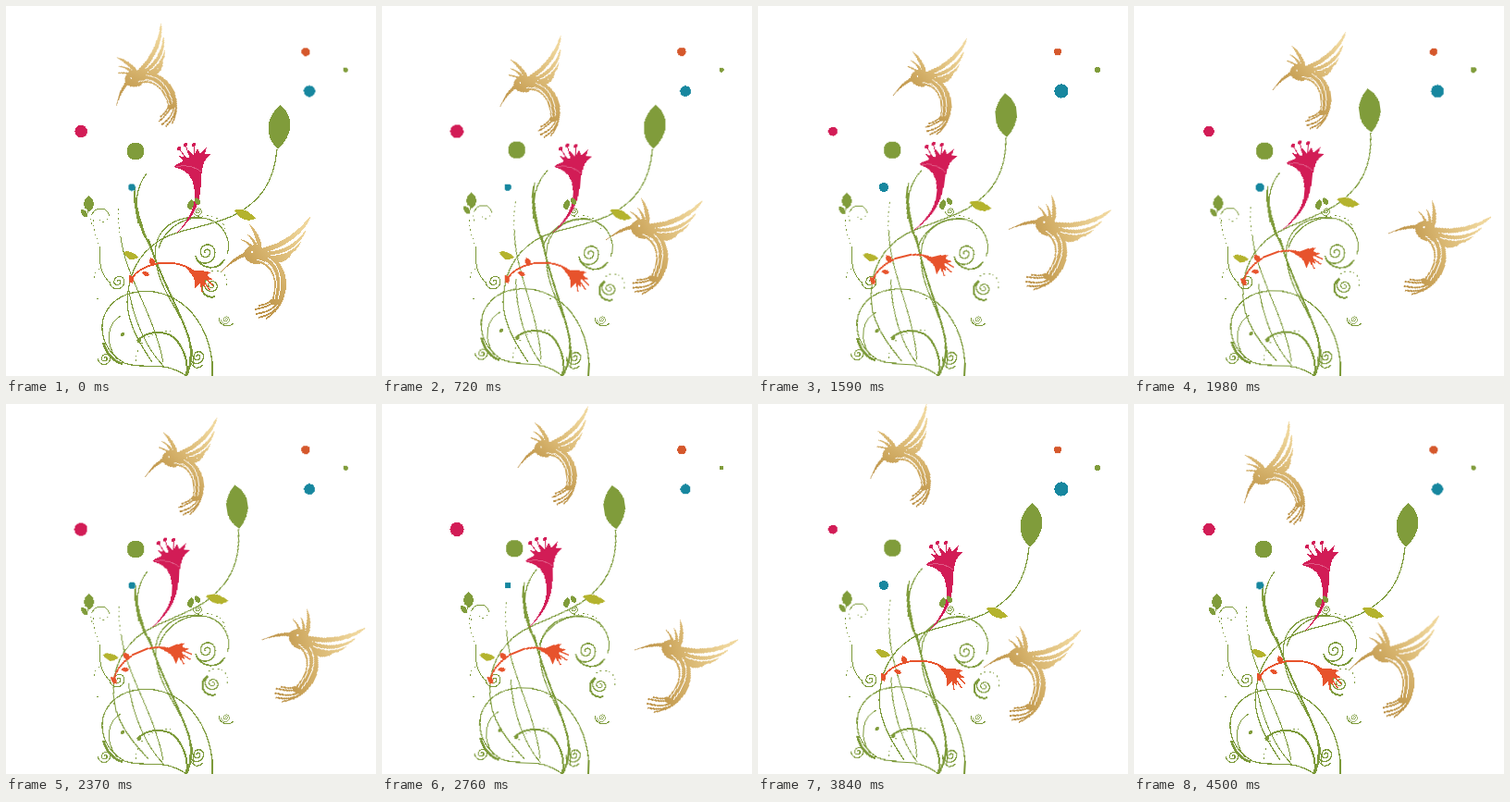
Recreate the animation shown at these times as an HTML page without scripts. Size 400 px wide and 400 px high, loop 4.53 s.

```html
<!DOCTYPE html>
<html lang="en">
<head>
<meta charset="utf-8">
<title>Hummingbirds and flowers</title>
<style>
  html, body { margin: 0; width: 100%; height: 100%; overflow: hidden; background: #fff; }
  svg { display: block; width: 100%; height: 100%; shape-rendering: crispEdges; }

  .line { fill: none; stroke: #7b9938; stroke-width: 1.2; }
  .fine { stroke-width: 1; }
  .faint { stroke-width: 1; stroke-dasharray: 2 3 1 4; }
  .bold { stroke-width: 2; }
  .green { fill: #809c3b; stroke: none; }
  .lime { fill: #b4b32e; }
  .pink { fill: #d21c56; }
  .orange { fill: #e7532c; }
  .teal { fill: #17879f; }

  /* Two sways per loop */
  .sway, .loops, .sprig, .ball, .curl, .dot {
    animation: 1.1325s cubic-bezier(.37, 0, .63, 1) infinite alternate;
  }
  .sway, .loops { transform-origin: 195px 400px; }
  .sway { animation-name: sway; }
  .loops { animation-name: loops; }
  .sprig { animation-name: sprig; }
  .ball { animation-name: ball; }
  .curl { animation-name: curl; }
  .dot { animation-name: pulse; animation-delay: -.7s; transform-box: fill-box; transform-origin: center; }
  .dot.late { animation-delay: -1.8325s; }
  @keyframes sway { to { transform: rotate(10deg); } }
  @keyframes loops { to { transform: rotate(5deg); } }
  @keyframes sprig { to { transform: translate(10px, -5px); } }
  @keyframes ball { to { transform: translate(8px, -2px); } }
  @keyframes curl { to { transform: translate(33px, 5px); } }
  @keyframes pulse { from { transform: scale(var(--low)); } }

  /* One bend per loop */
  .stem, .trumpet, .bloom { animation: 4.53s cubic-bezier(.37, 0, .63, 1) infinite; }
  .stem { animation-name: bend; --bend: -9deg; transform-origin: 148px 410px; }
  .trumpet { animation-name: bend; --bend: -14deg; transform-origin: 134px 299px; }
  .bloom { animation-name: bloom; transform-origin: 186px 244px; }
  @keyframes bend {
    0%, 13%, 85%, 100% { transform: none; }
    52%, 58% { transform: rotate(var(--bend)); }
  }
  @keyframes bloom {
    0%, 85%, 100% { transform: rotate(0deg); }
    42% { transform: rotate(13.5deg); }
  }

  .upper, .lower { animation: 4.53s linear infinite; }
  .upper { animation-name: upper; }
  .lower { animation-name: lower; }
  @keyframes upper {
    0%, 100% { transform: translate(119px, 109px) rotate(-29.8deg); }
    8% { transform: translate(122px, 111.5px) rotate(-24.5deg); }
    15.9% { transform: translate(127px, 110px) rotate(-17.7deg); }
    21.2% { transform: translate(133px, 106px) rotate(-12deg); }
    26.5% { transform: translate(139px, 101px) rotate(-7deg); }
    35% { transform: translate(145px, 98px) rotate(-6deg); }
    43.7% { transform: translate(149px, 92px) rotate(-6.7deg); }
    52.3% { transform: translate(149.5px, 80px) rotate(-7.8deg); }
    60.9% { transform: translate(146px, 70px) rotate(-9.4deg); }
    73% { transform: translate(136px, 72px) rotate(-14deg); }
    84.8% { transform: translate(121px, 82px) rotate(-21.4deg); }
    92.4% { transform: translate(118px, 100px) rotate(-27deg); }
    96% { transform: translate(118.5px, 107px) rotate(-29.2deg); }
  }
  @keyframes lower {
    0%, 100% { transform: translate(233px, 287px); }
    8% { transform: translate(235.5px, 271px) rotate(4.4deg); }
    15.9% { transform: translate(242px, 253px) rotate(9.5deg); }
    21.2% { transform: translate(253px, 245px) rotate(14.3deg); }
    26.5% { transform: translate(264px, 241px) rotate(18.6deg); }
    35% { transform: translate(271px, 241.5px) rotate(20.8deg); }
    43.7% { transform: translate(275px, 246px) rotate(22.3deg); }
    52.3% { transform: translate(276.5px, 255px) rotate(25deg); }
    60.9% { transform: translate(273px, 266px) rotate(25.8deg); }
    73% { transform: translate(266px, 277px) rotate(22deg); }
    84.8% { transform: translate(244px, 285px) rotate(10.4deg); }
    92.4% { transform: translate(236px, 288px) rotate(4.6deg); }
  }
</style>
</head>
<body>
<svg viewBox="0 0 400 400">
  <defs>
    <linearGradient id="gold" gradientUnits="userSpaceOnUse" x1="5" y1="20" x2="90" y2="-45">
      <stop offset="0" stop-color="#b48639"/>
      <stop offset=".35" stop-color="#c8a157"/>
      <stop offset=".6" stop-color="#dab873"/>
      <stop offset="1" stop-color="#efd69b"/>
    </linearGradient>
    <path id="spiral" d="M0 0a2.5 2.5 0 0 1 5 0a4.5 4.5 0 0 1-9 0a7 7 0 0 1 14 0a10 10 0 0 1-20 0"/>
    <g id="bird">
      <g fill="url(#gold)">
        <path d="M0 0C7-9 15-16 24-20C27-29 38-32 45-25C51-19 49-9 40-8C33-7 27-11 25-16C16-13 8-7 0 0Z"/>
        <path d="M36-10C50-9 57 2 57 15C57 24 55 31 52 36L62 36C67 31 70 24 70 14C70-3 60-17 44-21Z"/>
        <path d="M44-25C66-30 84-44 97-61C92-43 70-26 45-20Z"/>
        <path d="M46-21C66-22 80-29 92-46C86-27 68-18 47-17Z"/>
        <path d="M47-17C64-16 75-20 86-32C79-16 64-12 48-13Z"/>
        <path d="M48-14C60-12 69-14 77-21C72-9 60-8 50-10Z"/>
        <path d="M44-22C44-34 38-45 29-53C35-43 38-33 40-23Z"/>
        <path d="M41-22C38-33 33-38 25-42C32-37 35-31 37-23Z"/>
        <path d="M37-23C33-30 28-33 20-35C27-31 31-28 34-23Z"/>
      </g>
      <path fill="none" stroke="url(#gold)" stroke-width="1.7" d="M67 27C62 41 53 47 40 50M63 30C58 40 50 44 37 46M59 31C53 37 46 39 36 41M55 30C51 35 46 36 40 37M66 30C61 42 55 47 48 51"/>
      <path fill="none" stroke="#fff" d="M47-11C58-4 62 10 57 30M50-15C63-7 67 10 61 30M38-13C50-10 56-3 58 7"/>
      <circle cx="33" cy="-21" r="1" fill="#fff"/>
    </g>
  </defs>

  <g class="loops line">
    <path d="M195 400C170 382 148 394 128 386C96 368 95 326 130 312C170 298 216 325 223 385V400"/>
    <path stroke-width="2.6" d="M105 364C109 376 116 384 126 387"/>
    <path class="fine" d="M120 382C106 364 110 343 124 335"/>
    <path class="bold" d="M142 362C153 350 176 350 185 362C194 374 197 388 195 400"/>
    <path class="faint" d="M140 384C142 360 160 350 182 352"/>
    <use href="#spiral" transform="translate(206 379) scale(.75)" stroke-width="1.8"/>
    <path d="M198.500 379C199 390 206 395 213 388"/>
    <use href="#spiral" transform="translate(106 381) scale(.65)" stroke-width="1.8"/>
    <circle class="green" cx="126" cy="355" r="2"/>
    <circle class="green" cx="144" cy="362" r="2"/>
    <path d="M165 262C174 235 203 222 225 233C240 242 243 259 239 268"/>
    <use href="#spiral" transform="translate(215 267) rotate(-25) scale(1.1)"/>
    <path stroke-width="1.7" d="M205 270C208 284 229 288 236 274"/>
  </g>

  <g class="sway line">
    <path class="green" d="M158 265C142 240 135 216 139 191C140 216 146 236 158 265Z"/>
    <path d="M143 235C138 210 142 194 152 181"/>
    <path class="bold" d="M154 252C164 290 187 325 198 360Q203 383 195 400"/>
    <path d="M204 228C173 230 158 249 162 275C168 320 201 335 203 390"/>
    <path class="faint" d="M121 219Q121 236 124 250"/>
    <path class="fine" d="M124 250C130 295 159 330 170 385"/>
    <path class="fine" d="M132 302C136 332 149 368 171 390"/>
  </g>

  <g class="curl line">
    <use href="#spiral" transform="translate(222 301) rotate(60) scale(.75)" stroke-width="1.5"/>
    <path class="bold" d="M217 294C206 302 213 318 226 314"/>
    <path class="faint" d="M218 289C230 282 241 289 238 302"/>
  </g>

  <g class="line">
    <use href="#spiral" transform="translate(237 339) scale(.45)" stroke-width="1.6"/>
    <path class="fine" d="M230 335C229 345 240 349 246 343"/>
    <use href="#spiral" transform="translate(120 298) scale(.8)" stroke-width="1.4"/>
    <path class="fine" d="M112 299C103 290 100 276 102 262"/>
    <path class="faint" d="M102 262Q95 246 94 230M95 294C96 287 100 284 104 283M98 316L101 318M181 316L184 318"/>
    <use href="#spiral" transform="translate(207 222) scale(.45)" stroke-width="2"/>
    <path class="faint" d="M207 228C224 224 236 231 238 245"/>
  </g>

  <g class="sprig">
    <path class="green" d="M89 205C97 211 97 217 90 222C82 218 82 211 89 205ZM81 220Q89 220 88 228Q81 229 81 220Z"/>
    <path class="line fine" d="M90 218L88 224M93 225C97 217 108 217 111 225"/>
    <path class="line faint" d="M93 236Q90 230 93 225M111 225C112 234 101 236 100 229"/>
  </g>

  <g class="stem">
    <path class="line" stroke-width="1.5" d="M293 155C290 190 275 212 245 227C215 240 185 241 165 254C141 270 132 292 131 320C132 346 146 367 158 385"/>
    <path class="green" d="M297 107C312 121 311 138 294 155C279 141 280 120 297 107Z"/>
    <path class="lime" d="M247 221Q258 216 270 230Q256 236 247 221ZM127 266Q136 263 143 272Q132 278 127 266Z"/>
    <g class="trumpet">
      <path fill="none" stroke="#e7532c" stroke-width="1.8" d="M134 299C139 284 160 276 180 278C190 279 197 282 203 287"/>
      <path class="orange" d="M190 279C199 284 206 288 211 286L222 288L217 291L224 296L215 296L215 304L209 300L204 305C206 297 202 289 190 279ZM133 291Q140 292 137 300Q132 299 133 291ZM147 288Q153 285 155 291Q150 294 147 288ZM156 272Q163 274 160 281Q153 280 156 272Z"/>
      <path fill="none" stroke="#e7532c" stroke-width="1.4" d="M210 297L212 309M213 296L220 307M214 293L224 302"/>
    </g>
    <g class="bloom">
      <path class="pink" d="M185 245C200 228 205 215 204 200C203 185 195 176 181 174C185 170 190 169 192 167L186 162L198 164L197 156L203 162L207 154L210 160L217 152L215 160L222 160C214 165 212 172 211 185C211 207 207 226 185 245Z"/>
      <path fill="none" stroke="#e05a86" d="M184 174Q198 170 211 179"/>
      <path fill="none" stroke="#d21c56" d="M197 168L187 154M200 167L194 150M203 166V150"/>
      <g class="pink"><circle cx="187" cy="154" r="2"/><circle cx="194" cy="150" r="2"/><circle cx="203" cy="150" r="2"/></g>
    </g>
  </g>

  <path class="green" d="M201 209Q206 215 199 221Q192 216 201 209ZM205 207Q212 209 209 215Q202 214 205 207Z"/>

  <circle class="green ball" cx="140" cy="157" r="9.5"/>
  <circle class="pink dot" style="--low:.66" cx="81" cy="135.500" r="7.6"/>
  <circle class="dot" style="--low:.8" fill="#d5582c" cx="324" cy="49.500" r="4.9"/>
  <circle class="teal dot late" style="--low:.66" cx="136" cy="196" r="5.2"/>
  <circle class="teal dot late" style="--low:.73" cx="328" cy="92" r="7.6"/>
  <circle class="green dot late" style="--low:.76" cx="367" cy="69" r="3.2"/>

  <g class="upper"><use href="#bird" transform="scale(.9)"/></g>
  <g class="lower"><use href="#bird"/></g>
</svg>
</body>
</html>
```
